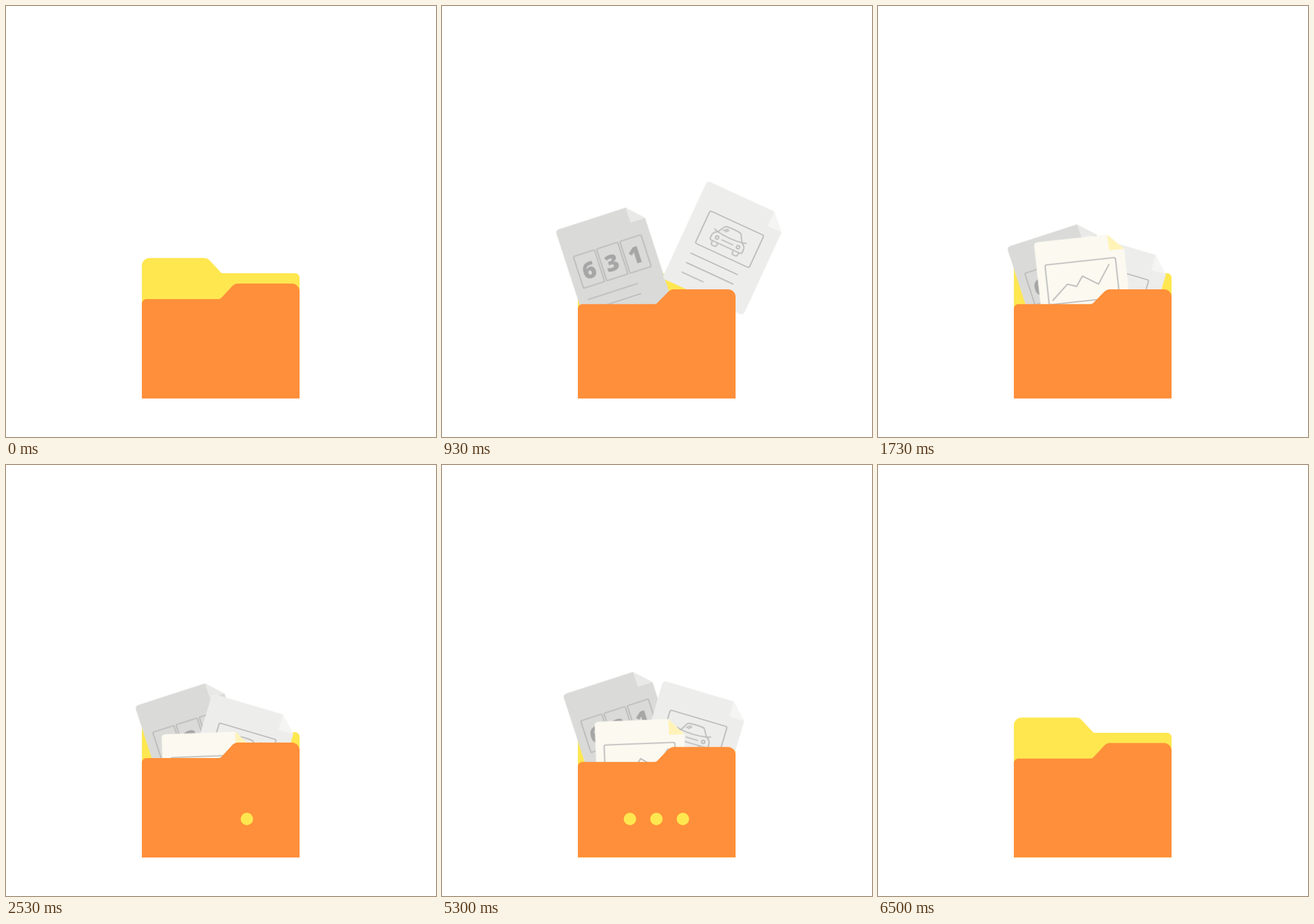
These frames come from a looping animation (747x750 px, 6530 ms). An HTML page:

```html
<!DOCTYPE html>
<html lang="en">
<head>
<meta charset="utf-8">
<title>Folder</title>
<style>
  html, body { margin: 0; width: 100%; height: 100%; overflow: hidden; background: #fff; }
  svg { display: block; width: 747px; height: 750px; }
  .paper { opacity: 0; }
  .ink { fill: none; stroke: #bcbcbc; stroke-width: 2.2; stroke-linecap: round; stroke-linejoin: round; }
  .digits { font: 800 41px "Open Sans", sans-serif; fill: #a6a6a6; text-anchor: middle; }
  .bounce, #front { transform-origin: 0 683px; }
  .dot { fill: #ffe750; opacity: 0; }
</style>
</head>
<body>
<svg viewBox="0 0 747 750">
  <defs>
    <path id="sheet" d="M6 0H128L155 27.5V181a6 6 0 0 1-6 6H6a6 6 0 0 1-6-6V6a6 6 0 0 1 6-6Z"/>
    <path id="fold" d="M128 0L155 27.5H128.5Z"/>
    <clipPath id="floor"><rect width="747" height="683"/></clipPath>
  </defs>

  <g class="bounce">
    <path fill="#ffe750" d="M236 683V452a13.5 13.5 0 0 1 13.5-13.5H344q6 0 10 4.500L374.500 465H502a8 8 0 0 1 8 8V683Z"/>
  </g>

  <g clip-path="url(#floor)">
    <g class="paper" id="numbers"><g transform="translate(-77.5 -93.5)">
      <use href="#sheet" fill="#dadad8"/>
      <use href="#fold" fill="#e9e9e8"/>
      <g class="ink">
        <rect x="15.5" y="53" width="38.500" height="58" rx="1.500"/>
        <rect x="58" y="53" width="38.500" height="58" rx="1.500"/>
        <rect x="100.5" y="53" width="38.500" height="58" rx="1.500"/>
        <path d="M17 132H107M17 150.500H107M17 169H58"/>
      </g>
      <g class="digits">
        <text x="34.500" y="98.500">6</text>
        <text x="76" y="98.500">3</text>
        <text x="119" y="98.500">1</text>
      </g>
    </g></g>

    <g class="paper" id="car"><g transform="translate(-77.5 -93.5)">
      <use href="#sheet" fill="#ededec"/>
      <use href="#fold" fill="#f5f5f4"/>
      <g class="ink">
        <rect x="26.500" y="45.500" width="103" height="62" rx="3"/>
        <path d="M27 126.500H116M27 144.700H116M27 163H67"/>
        <path d="M54 73L61 61Q62.500 58.500 66 58.300Q77 57.300 88 58.300Q91.500 58.500 93 61L100 73Q77 77 54 73Z"/>
        <path d="M54 73Q46.500 77 46.500 83V88Q46.500 91 50 91H104Q107.500 91 107.500 88V83Q107.500 77 100 73M47 71L53 73M107 71L101 73"/>
        <path d="M52 91V95Q52 98.500 56 98.500H58Q62 98.500 62 95V91M92 91V95Q92 98.500 96 98.500H98Q102 98.500 102 95V91"/>
        <circle cx="57" cy="82.700" r="2.800"/>
        <circle cx="97" cy="82.700" r="2.800"/>
        <path d="M66 83H87M62 67L68 62M66 67.500L70.500 63.500"/>
      </g>
    </g></g>

    <g class="paper" id="chart"><g transform="translate(-77.5 -93.5)">
      <use href="#sheet" fill="#fbf9f0"/>
      <use href="#fold" fill="#fff3b8"/>
      <g class="ink">
        <rect x="15" y="41" width="123" height="69.500" rx="3"/>
        <path d="M22.400 103.400L50.300 78.200L65.800 83.900L77.600 67L104 83.900L125.500 52"/>
        <path d="M16 130H106M16 148.500H106M16 167H57"/>
      </g>
    </g></g>
  </g>

  <g class="bounce">
    <path id="front" fill="#ff8f3a" d="M236 683V518a8 8 0 0 1 8-8H369q3 0 5-2L392.500 488Q397 483 403 483H496.500a13.500 13.500 0 0 1 13.500 13.500V683Z"/>
  </g>

  <circle class="dot" cx="418.500" cy="616" r="10.700"/>
  <circle class="dot" cx="372.500" cy="616" r="10.700"/>
  <circle class="dot" cx="326.500" cy="616" r="10.700"/>
</svg>

<script>
const LOOP = 6530;
const EXIT = { lift: 4880, peak: 5180, gone: 5520 };

// steps: [ms, value, easing to the next step]
function play(el, prop, steps) {
  const full = [...steps];
  if (full[0][0] > 0) full.unshift([0, full[0][1]]);
  const last = full[full.length - 1];
  if (last[0] < LOOP) full.push([LOOP, last[1]]);
  const frames = full.map(([ms, value, easing = "linear"]) =>
    ({ offset: ms / LOOP, [prop]: value, easing }));
  el.animate(frames, { duration: LOOP, iterations: Infinity });
}

// rest, from, peak and end are positions of the sheet's centre; the last three relative to rest
const papers = [
  { id: "numbers", start: 0, time: 1760, ease: "cubic-bezier(.4,0,.2,1)",
    rest: [326.4, 484.6], rot: -18, turn: 0,
    from: [-141, -153], peak: [-15.600, -28], end: [20, 150] },
  { id: "car", start: 520, time: 1350, ease: "cubic-bezier(.3,0,.2,1)",
    rest: [406, 509.3], rot: 16.5, turn: 16,
    from: [166, -170], peak: [27.2, -30], end: [0, 135] },
  { id: "chart", start: 973, time: 1400, ease: "cubic-bezier(.4,0,.2,1)",
    rest: [351.1, 559.3], rot: -2.2, turn: -22.5,
    from: [38, -356], peak: [-5.5, -26.7], end: [5, 80] }
];

for (const p of papers) {
  const el = document.getElementById(p.id);
  const pose = ([dx, dy], turn = 0) =>
    `translate(${p.rest[0] + dx}px, ${p.rest[1] + dy}px) rotate(${p.rot + turn}deg)`;
  const home = pose([0, 0]);
  play(el, "transform", [
    [p.start, pose(p.from, p.turn), p.ease],
    [p.start + p.time, home],
    [EXIT.lift, home, "ease-in-out"],
    [EXIT.peak, pose(p.peak), "cubic-bezier(.333,0,.667,0)"],
    [EXIT.gone, pose(p.end)]
  ]);
  play(el, "opacity", [
    [p.start + 25, 0], [p.start + 110, 1],
    [EXIT.gone, 1, "step-end"], [EXIT.gone + 5, 0]
  ]);
}

const scaleY = s => `scale(1, ${s})`;

play(document.getElementById("front"), "transform", [
  [680, scaleY(1), "ease-in-out"], [880, scaleY(.95)],
  [1780, scaleY(.95), "ease-in-out"], [2010, scaleY(1)],
  [EXIT.lift, scaleY(1), "ease-in-out"], [EXIT.peak + 20, scaleY(.95), "ease-in-out"],
  [5500, scaleY(1)]
]);

// damped wobble of the closed folder
const wobble = [[5500, scaleY(1), "ease-out"]];
for (let i = 0; i < 5; i++) {
  const s = (i + .5) * .215;
  const swing = .019 * Math.exp(-1.44 * s) * (i % 2 ? 1 : -1);
  wobble.push([5500 + s * 1000, scaleY(1 + swing), "ease-in-out"]);
}
wobble.push([LOOP, scaleY(.997)]);
document.querySelectorAll(".bounce").forEach(el => play(el, "transform", wobble));

const cycles = [2290, 3370, 4470];
const delays = [0, 260, 600];
document.querySelectorAll(".dot").forEach((el, i) => {
  const steps = [[0, 0, "step-end"]];
  for (const c of cycles) steps.push([c + delays[i], 1, "step-end"], [c + 930, 0, "step-end"]);
  play(el, "opacity", steps);
});
</script>
</body>
</html>
```
